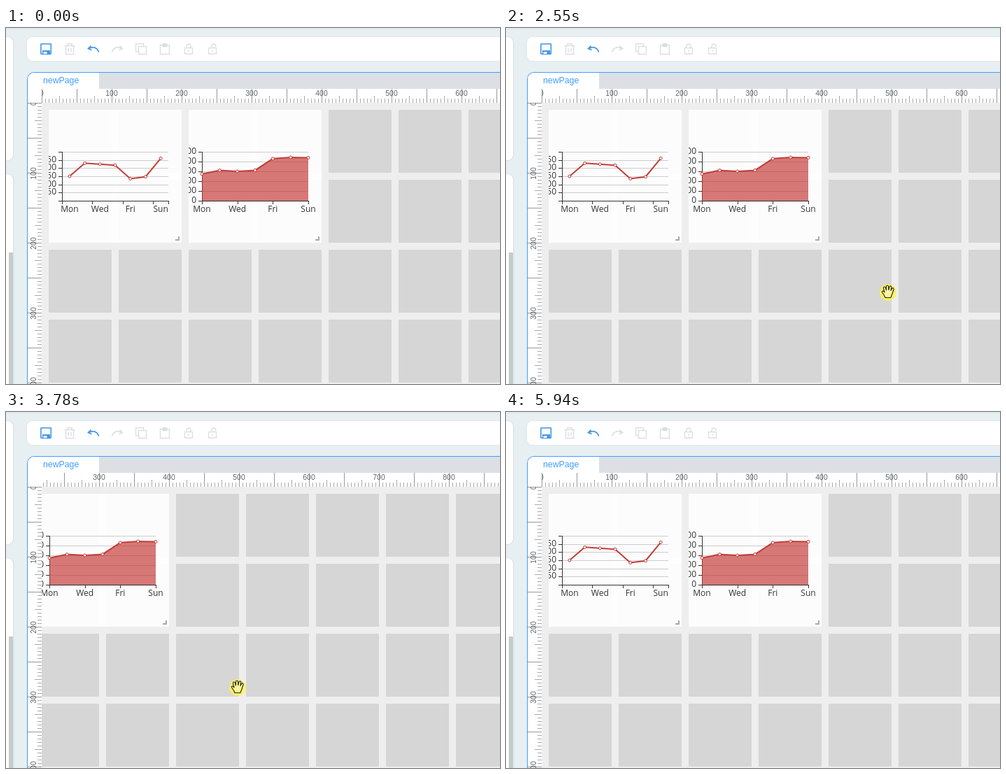
These frames come from a looping animation (706x509 px, 6.26 s). An HTML page with a canvas:

```html
<!DOCTYPE html>
<html lang="en">
<head>
<meta charset="utf-8">
<title>Page editor</title>
<style>
html, body { margin: 0; width: 100%; height: 100%; overflow: hidden; background: #e7eff2; }
canvas { display: block; }
</style>
</head>
<body>
<canvas id="stage" width="706" height="509"></canvas>
<script>
const W = 706, H = 509, LOOP = 6260, STEP = 77;
const BLUE = '#409eff', ICON = '#4196e6', OFF = '#dcdee1', RED = '#c23531';
const LEFT = 51, TOP = 107;
const c = document.getElementById('stage').getContext('2d');

// step, pointer x, pointer y, scroll x, scroll y
const track = [
  [1, 602, 444, 0, 0], [3, 552, 403, 0, 0], [8, 262, 224, 0, 0], [9, 229, 204, 0, 0],
  [10, 215, 199, 0, 0], [13, 215, 199, 0, 0], [18, 424, 318, 0, 0], [21, 557, 379, 0, 0],
  [23, 557, 379, 0, 0], [29, 546, 377, 0, 0], [33, 546, 377, 0, 0], [39, 344, 239, 198, 140],
  [49, 331, 393, 218, 0], [53, 549, 420, 0, 0], [55, 637, 434, 0, 0],
  [60, 605, 296, 32, 138], [66, 637, 310, 0, 124], [70, 660, 440, 0, 0], [72, 690, 530, 0, 0]
];
const DRAG = { x: 552, y: 403, from: 4, to: 12, clear: 23 };
const HAND_FROM = 32, GONE = 72;

const charts = [
  { x: 61, max: 300, data: [150, 230, 224, 218, 135, 147, 260], band: true,
    labels: ['', '50', '100', '150', '200', '250', ''] },
  { x: 261, max: 1500, data: [820, 932, 901, 934, 1290, 1330, 1320], band: false,
    labels: ['0', '300', '600', '900', '1,200', '1,500'] }
];

function stateAt(n) {
  let i = 0;
  while (i < track.length - 2 && track[i + 1][0] <= n) i++;
  const a = track[i], b = track[i + 1];
  const k = Math.min(1, Math.max(0, (n - a[0]) / (b[0] - a[0])));
  const [, x, y, sx, sy] = a.map((v, j) => Math.round(v + (b[j] - v) * k));
  return { x, y, sx, sy };
}

function box(x, y, w, h, color, r = 0) {
  c.fillStyle = color;
  c.beginPath();
  c.roundRect(x, y, w, h, r);
  c.fill();
}

function stroke(path, color, width = 1) {
  c.strokeStyle = color;
  c.lineWidth = width;
  c.stroke(new Path2D(path));
}

function text(s, x, y, font, color, align = 'center') {
  c.font = font;
  c.fillStyle = color;
  c.textAlign = align;
  c.textBaseline = 'middle';
  c.fillText(s, x, y);
}

function clipped(x, y, w, h, draw) {
  c.save();
  c.beginPath();
  c.rect(x, y, w, h);
  c.clip();
  draw();
  c.restore();
}

function at(x, y, draw) {
  c.save();
  c.translate(x, y);
  draw();
  c.restore();
}

// Toolbar icons, each around its own centre
const arrowBack = 'M-3.5 -4.5L-7.5 -.5L-2.5 1.5M-7 -.5C-2 -4 5 -3 7.5 4.5';
const body = 'M-5.5 -1.5h11v8.5h-11zM0 1.5v2.5';
const icons = [
  col => {
    stroke('M-6.5 -7.2h13.2q.6 0 .6 .6v13.2q0 .6 -.6 .6h-13.2q-.6 0 -.6 -.6v-13.2q0 -.6 .6 -.6z', col, 1.6);
    box(-5, 2, 11, 5, col);
    box(-3.5, 4, 5, 3, '#fff');
  },
  col => stroke('M-7.5 -4.5h15M-3 -5v-2.5h6v2.5M-5.5 -4.5v12h11v-12M-2 -1v5.5M2 -1v5.5', col, 1.4),
  col => stroke(arrowBack, col, 1.7),
  col => { c.scale(-1, 1); stroke(arrowBack, col, 1.7); },
  col => stroke('M-3.5 -3.5h11v11h-11zM-4 3.5h-3.5v-11h11v3.5', col, 1.4),
  col => {
    stroke('M-6.5 -5.5h13v13h-13z', col, 1.4);
    box(-3.5, -8, 7, 5, col);
  },
  col => stroke(body + 'M-3 -1.5v-2.5a3 3 0 0 1 6 0v2.5', col, 1.3),
  col => stroke(body + 'M-1 -1.5v-2.5a3 3 0 0 1 6 0v1', col, 1.3)
];

function drawFrame(active) {
  box(0, 0, W, H, '#e7eff2');
  box(0, 0, W, 2, '#e1eaed');
  for (const [y, h] of [[12, 178], [208, 320]]) {
    box(-20, y, 31.5, h, '#dbe4e8', 9);
    box(-20, y + 1, 30, h - 2, '#fff', 8);
  }
  box(4, 321, 6, 188, '#c7cacb');
  box(29, 12, 700, 36, '#dfe7eb', 9);
  box(30, 13, 700, 34, '#fff', 8);
  icons.forEach((draw, i) => {
    const on = i === 0 || i === 2 || (active && (i === 1 || i === 6));
    at(57 + 34 * i, 30, () => draw(on ? ICON : OFF));
  });
  box(30, 63, 720, 500, BLUE, [10, 0, 0, 0]);
  box(31, 64, 720, 500, '#dcdfe4', [9, 0, 0, 0]);
  box(31, 64, 102, 23, '#fff', [9, 2, 0, 0]);
  box(31, 87, W, H, '#fff');
  text('newPage', 53, 76, '12.3px "Liberation Sans", Arial, sans-serif', BLUE, 'left');
}

// Ticks run along x; the caller turns the axis for the vertical ruler
function drawRuler(scroll, length, sign) {
  for (let v = Math.floor(scroll / 100) * 100; v <= scroll + length + 100; v += 5) {
    if (v < 0) continue;
    const p = sign * (v - scroll) + (sign > 0 ? 0 : -1);
    const size = v % 50 === 0 ? 20 : v % 25 === 0 ? 10 : 6;
    box(p, 20 - size, 1, size, v % 50 ? '#a9a9a9' : '#979797');
    if (v % 100 === 0) text(v, p, sign > 0 ? 7 : 9, '10.4px "Liberation Sans", Arial, sans-serif', '#5f646c');
  }
}

function drawChart({ x, max, data, band, labels }) {
  const font = '12px "Open Sans", "Noto Sans", sans-serif';
  const x0 = x + 19, base = 247, w = 152, h = 70, n = labels.length - 1;
  const gap = band ? w / 7 : w / 6;
  const px = i => x0 + gap * (i + (band ? .5 : 0));
  const py = v => base - h * v / max;

  labels.forEach((label, i) => {
    const y = Math.round(base - h * i / n);
    if (i) box(x0, y, w, 1, '#ccc');
    box(x0 - 5, y, 5, 1, '#333');
    text(label, x0 - 8, y, font, '#333', 'right');
  });
  box(x0, base - h, 1, h, '#333');
  box(x0, base, w, 1, '#333');
  const ticks = [0, 2, 4, 6];
  if (band) ticks.push(7);
  ticks.forEach(i => box(Math.round(x0 + gap * i), base, 1, 5, '#333'));
  ['Mon', 'Wed', 'Fri', 'Sun'].forEach((d, i) => text(d, px(2 * i), 260, font, '#333'));

  const line = 'M' + data.map((v, i) => px(i) + ' ' + py(v)).join('L');
  if (!band) {
    c.fillStyle = 'rgba(194,53,49,.66)';
    c.fill(new Path2D(`${line}V${base}H${x0}Z`));
  }
  stroke(line, '#c0403c', 2);
  data.forEach((v, i) => {
    c.beginPath();
    c.arc(px(i), py(v), 2, 0, 7);
    c.fillStyle = '#fff';
    c.fill();
    c.strokeStyle = RED;
    c.lineWidth = 1;
    c.stroke();
  });
}

function drawPage(sx, sy, chosen) {
  box(LEFT, TOP, W, H, '#eee');
  c.translate(-sx, -sy);
  for (let i = 0; i < 10; i++)
    for (let j = 0; j < 6; j++) box(61 + 100 * i, 117 + 100 * j, 90, 90, '#d6d6d6', 1);
  charts.forEach((chart, i) => {
    const x = chart.x;
    clipped(x, 117, 190, 190, () => {
      box(x, 117, 190, 190, 'rgba(255,255,255,.92)');
      drawChart(chart);
    });
    stroke(`M${x + 186} 298v5h-5`, '#aaa', 2);
    if (chosen[i]) {
      c.setLineDash([6, 4]);
      stroke(`M${x} 118h190M${x} 306h190M${x + 1} 117v190M${x + 189} 117v190`, '#1ea7e1', 2);
      c.setLineDash([]);
    }
  });
}

function drawPointer(x, y, hand) {
  at(x, y, () => {
    c.fillStyle = 'rgba(255,245,60,.72)';
    c.beginPath();
    c.arc(0, hand ? 1 : 0, 12, 0, 7);
    c.fill();
    c.lineJoin = 'round';
    const shape = hand
      ? 'M-4 8.5C-5 5 -7.5 3 -8.5 .5C-9 -1.5 -6.5 -1.5 -5 1L-6.5 -5C-6.8 -7.5 -4.2 -7.8 -3.5 -5.5L-2.5 -2L-2.5 -7.5C-2.3 -9.5 .3 -9.5 .5 -7.5L.8 -2.5L2 -7C2.6 -9 5 -8.5 4.7 -6.3L4 -1.5L5.7 -4.5C6.8 -6.2 8.8 -5 8 -3L6.2 2.5C5.5 5 4.5 6 4 8.5Z'
      : 'M.5 -.5V15.5L4.3 12L6.8 18L9.3 17L6.8 11.3H12Z';
    c.fillStyle = hand ? '#fbf59a' : '#fff';
    c.fill(new Path2D(shape));
    stroke(shape, '#222', 1.1);
  });
}

function render(t) {
  const n = Math.floor((t + 10) / STEP);
  const { x, y, sx, sy } = n < GONE ? stateAt(n) : { sx: 0, sy: 0 };
  const corner = stateAt(Math.min(n - 1, 10));
  const picking = n >= DRAG.from && n < DRAG.clear;
  const chosen = charts.map(w => picking && corner.x < w.x + 190 && corner.y < 307);

  drawFrame(chosen.some(Boolean));
  clipped(LEFT, 87, W, 20, () => at(LEFT, 87, () => drawRuler(sx, W - LEFT, 1)));
  clipped(31, TOP, 20, H, () => at(31, TOP, () => {
    c.rotate(-Math.PI / 2);
    drawRuler(sy, H - TOP, -1);
  }));
  clipped(LEFT, TOP, W, H, () => drawPage(sx, sy, chosen));

  if (n >= DRAG.from && n <= DRAG.to) {
    const w = DRAG.x - corner.x, h = DRAG.y - corner.y;
    box(corner.x, corner.y, w, h, 'rgba(100,150,185,.13)');
    c.beginPath();
    c.roundRect(corner.x, corner.y, w, h, 2);
    c.strokeStyle = '#64a6db';
    c.lineWidth = 2;
    c.stroke();
  }
  if (n > 0 && n < GONE) drawPointer(x, y, n >= HAND_FROM);
}

const start = performance.now();
function tick() {
  render((performance.now() - start) % LOOP);
  requestAnimationFrame(tick);
}
tick();
</script>
</body>
</html>
```
